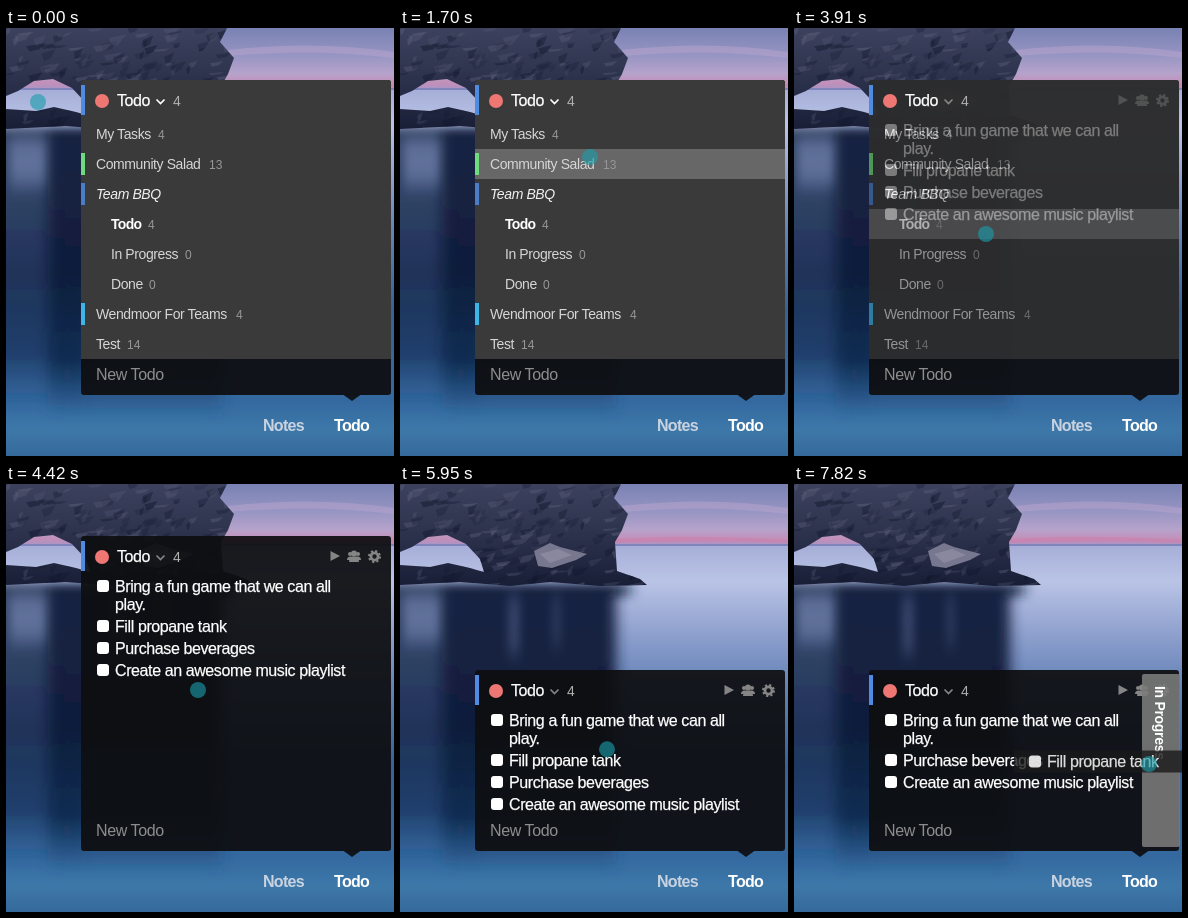
An HTML page for the animation above (7.99 s loop, 388 by 428 pixels).

```html
<!DOCTYPE html>
<html lang="en">
<head>
<meta charset="utf-8">
<title>Todo panel</title>
<style>
  html, body { margin: 0; width: 100%; height: 100%; overflow: hidden; background: #16294c; }
  svg { display: block; width: 388px; height: 428px; }
  text { font: 16px "Liberation Sans", Arial, sans-serif; letter-spacing: -.4px; fill: #fff; white-space: pre; }
  .item { stroke: #fff; stroke-width: .25px; }
  .row { font-size: 14px; fill: #d6d6d6; }
  .strong { font-weight: bold; fill: #fff; letter-spacing: -.7px; }
  .title { font-style: italic; fill: #f0f0f0; }
  .count { font-size: 12px; letter-spacing: 0; fill: #979797; }
  .hint { fill: #8d8d8d; }
  .tab { font-weight: bold; letter-spacing: -.7px; }
</style>
</head>
<body>
<svg viewBox="0 0 388 428">
  <defs>
    <linearGradient id="sky" x2="0" y2="1">
      <stop offset="0" stop-color="#7982b3"/>
      <stop offset=".45" stop-color="#9795c3"/>
      <stop offset=".75" stop-color="#b6a3cb"/>
      <stop offset=".9" stop-color="#c38fb9"/>
      <stop offset="1" stop-color="#a994c4"/>
    </linearGradient>
    <linearGradient id="water" x2="0" y2="1">
      <stop offset="0" stop-color="#a5add6"/>
      <stop offset=".1" stop-color="#bac4e6"/>
      <stop offset=".24" stop-color="#8fa1ce"/>
      <stop offset=".38" stop-color="#6784b8"/>
      <stop offset=".6" stop-color="#36629a"/>
      <stop offset=".85" stop-color="#3469a0"/>
      <stop offset=".93" stop-color="#3d78a9"/>
      <stop offset="1" stop-color="#35699b"/>
    </linearGradient>
    <linearGradient id="shade" x2="0" y2="1">
      <stop offset="0" stop-color="#172344"/>
      <stop offset=".5" stop-color="#101d3b"/>
      <stop offset=".8" stop-color="#12294e" stop-opacity=".85"/>
      <stop offset="1" stop-color="#1d4473" stop-opacity="0"/>
    </linearGradient>
    <linearGradient id="stone" x2="0" y2="1">
      <stop offset="0" stop-color="#3c425e"/>
      <stop offset=".55" stop-color="#2b304a"/>
      <stop offset="1" stop-color="#181e36"/>
    </linearGradient>
    <filter id="soft" x="-30%" y="-30%" width="160%" height="160%"><feGaussianBlur stdDeviation="7 5"/></filter>
    <filter id="haze" x="-30%" y="-30%" width="160%" height="160%"><feGaussianBlur stdDeviation="4 9"/></filter>
    <clipPath id="rockClip">
      <path id="rockShape" clip-rule="evenodd" fill-rule="evenodd" d="M0 0H221L214 14L228 30L222 46L215 58L217 87L240 95L247 101L200 102L150 98L110 102L60 98L0 101V81L30 83L48 79L70 84L84 88L80 75L66 60L47 51L28 53L12 63L0 68Z"/>
    </clipPath>
  </defs>

  <rect width="388" height="61" fill="url(#sky)"/>
  <path d="M215 55Q300 50 388 56V59Q300 56 215 59Z" fill="#cb82ae" opacity=".7"/>
  <path d="M222 22Q310 12 388 24V30Q310 20 222 28Z" fill="#b9a5cd" opacity=".5"/>
  <rect y="60" width="388" height="368" fill="url(#water)"/>
  <rect y="60" width="388" height="2" fill="#7f85bb"/>
  <g filter="url(#soft)">
    <rect x="-30" y="112" width="110" height="270" fill="url(#shade)" opacity=".72"/>
    <rect x="42" y="101" width="174" height="290" fill="url(#shade)"/>
    <rect x="-20" y="99" width="250" height="14" fill="#152040" opacity=".75"/>
  </g>
  <g filter="url(#haze)" fill="#8090bf">
    <rect x="4" y="112" width="36" height="45" opacity=".55"/>
    <rect x="108" y="112" width="12" height="58" opacity=".3"/>
    <rect x="152" y="112" width="9" height="50" opacity=".2"/>
  </g>
  <use href="#rockShape" fill="url(#stone)"/>
  <g id="facets" clip-path="url(#rockClip)"></g>
  <path d="M134 67L150 59L160 63L187 70L176 76L152 84L138 82Z" fill="#77778f"/>
  <path d="M140 70L158 65L172 71L150 79Z" fill="#9695a8" opacity=".6"/>

  <text class="tab" x="257" y="403" style="fill:#c9d3e0">Notes</text>
  <text class="tab" x="328" y="403">Todo</text>
  <path d="M337 366.500H355L346 373Z" fill="#10141b"/>
  <rect id="panel" x="75" width="310" rx="3" fill="#0d0e11" fill-opacity=".93"/>
  <text class="hint" x="90" y="352">New Todo</text>

  <g id="list">
    <g id="icons" fill="#858585">
      <path d="M324.500 67L334 72L324.500 77Z"/>
      <g id="people">
        <circle cx="344" cy="70" r="2"/><circle cx="352" cy="70" r="2"/>
        <path d="M341 76Q341 72.500 344.500 72.500H351.500Q355 72.500 355 76Z"/>
        <circle cx="348" cy="69.500" r="3"/>
        <path d="M343 78Q343 73.500 348 73.500T353 78Z"/>
      </g>
      <circle cx="368.500" cy="72.500" r="3.600" fill="none" stroke="#858585" stroke-width="2.800"/>
      <circle cx="368.500" cy="72.500" r="5.500" fill="none" stroke="#858585" stroke-width="2" stroke-dasharray="2.160"/>
    </g>
  </g>

  <g id="menu">
    <path d="M75 331V55Q75 52 78 52H382Q385 52 385 55V331Z" fill="#3a3a3a"/>
    <rect id="hover" x="75" width="310" height="30" fill="#676767"/>
  </g>

  <g id="header">
    <rect x="75" y="57" width="4" height="30" fill="#4f8be0"/>
    <circle cx="96" cy="73" r="7" fill="#ee7774"/>
    <text class="item" x="111" y="78">Todo</text>
    <path id="chevron" d="M150.500 71.500L154.500 75.500L158.500 71.500" fill="none" stroke-width="1.700"/>
    <text class="count" x="167" y="78" style="font-size:14px;fill:#b0b0b0">4</text>
  </g>

  <g id="zone">
    <rect id="zoneBox" y="190" height="173" rx="2" fill="#7b7b7b" fill-opacity=".88"/>
    <text id="zoneText" class="strong" transform="translate(361 202) rotate(90)" style="font-size:14px;letter-spacing:-.3px">In Progress</text>
  </g>
  <g id="dragged">
    <rect x="76" y="265" width="330" height="22" fill="#191919" fill-opacity=".8"/>
    <g fill="#ddd"><circle cx="362" cy="276.500" r="1.500"/><circle cx="367" cy="276.500" r="1.500"/><circle cx="372" cy="276.500" r="1.500"/></g>
  </g>
  <circle id="cursor" r="8" fill="#1a9dab" fill-opacity=".62"/>
</svg>
<script>
const FRAME = 170, LOOP = 7990;
const MENU_CLOSE = 3910, SHRINK = 5100, GRAB = 6290, REFLOW = 7480;
const TALL = 52, SHORT = 186;

const $ = id => document.getElementById(id);

function add(parent, tag, attrs, content) {
  const el = document.createElementNS('http://www.w3.org/2000/svg', tag);
  for (const key in attrs) el.setAttribute(key, attrs[key]);
  if (content) el.textContent = content;
  parent.appendChild(el);
  return el;
}

// Rock texture: seeded slanted facets
let seed = 11;
const random = () => (seed = seed * 16807 % 2147483647) / 2147483647;
for (let i = 0; i < 170; i++) {
  const x = random() * 240, y = random() * 102, w = 4 + random() * 16, h = 2 + random() * 7;
  add($('facets'), 'path', {
    d: `M${x} ${y}l${w} ${-h / 2}l${-w / 3} ${h}l${-w / 2} ${h / 3}Z`,
    fill: random() < .45 ? '#5e617b' : '#11172d',
    opacity: .15 + random() * .35
  });
}

// Menu rows: label, count, indent, count position, class, stripe
const ROWS = [
  ['My Tasks', 4, 90, 152, ''],
  ['Community Salad', 13, 90, 203, '', '#70db7c'],
  ['Team BBQ', '', 90, 0, 'title', '#4b7dc6'],
  ['Todo', 4, 105, 142, 'strong'],
  ['In Progress', 0, 105, 179, ''],
  ['Done', 0, 105, 143, ''],
  ['Wendmoor For Teams', 4, 90, 230, '', '#3fb4e6'],
  ['Test', 14, 90, 121, '']
];
ROWS.forEach(([label, count, x, countX, style, stripe], i) => {
  const y = 106 + i * 30, menu = $('menu');
  if (stripe) add(menu, 'rect', { x: 75, y: y - 11, width: 4, height: 22, fill: stripe });
  add(menu, 'text', { class: 'row ' + style, x, y: y + 5 }, label);
  if (count !== '') add(menu, 'text', { class: 'count', x: countX, y: y + 5 }, String(count));
});

function addItem(parent, y, ...lines) {
  const item = add(parent, 'g', {});
  add(item, 'rect', { x: 91, y: y - 6, width: 12, height: 12, rx: 3, fill: '#fff' });
  lines.forEach((line, i) => add(item, 'text', { class: 'item', x: 109, y: y + 5.5 + i * 18 }, line));
  return item;
}
addItem($('list'), 102, 'Bring a fun game that we can all', 'play.');
const tank = addItem($('list'), 142, 'Fill propane tank');
const rest = add($('list'), 'g', {});
addItem(rest, 164, 'Purchase beverages');
addItem(rest, 186, 'Create an awesome music playlist');
addItem($('dragged'), 276, 'Fill propane tank').setAttribute('opacity', .85);

const PATH = [
  [0, 32, 74], [170, 34, 75], [680, 116, 82], [1190, 186, 100], [1700, 190, 129],
  [2210, 191, 178], [2380, 191, 178], [2890, 192, 195], [3400, 192, 206],
  [4930, 192, 206], [5100, 190, 207], [5610, 199, 240], [6120, 211, 278],
  [6290, 211, 279], [6800, 235, 280], [7310, 289, 280], [7820, 355, 280]
];
const ZONE = [[6290, 0], [6630, 8], [7310, 8], [7820, 38]];
const MENU_FADE = [[3740, 1], [4250, 0]];

function at(track, t, column = 1) {
  const next = track.findIndex(step => step[0] > t);
  if (next === 0) return track[0][column];
  if (next < 0) return track[track.length - 1][column];
  const a = track[next - 1], b = track[next];
  return a[column] + (b[column] - a[column]) * (t - a[0]) / (b[0] - a[0]);
}

const set = (id, name, value) => $(id).setAttribute(name, value);
const show = (el, visible) => { el.style.display = visible ? '' : 'none'; };

function render(t) {
  const x = at(PATH, t, 1), y = at(PATH, t, 2);
  const top = t < SHRINK ? TALL : SHORT;
  const menuOpen = t < MENU_CLOSE, dragging = t >= GRAB;

  set('panel', 'y', top);
  set('panel', 'height', 367 - top);
  for (const id of ['list', 'header']) set(id, 'transform', `translate(0 ${top - TALL})`);

  const fade = at(MENU_FADE, t);
  show($('menu'), fade > 0);
  set('menu', 'opacity', fade);
  const row = Math.floor((y - 91) / 30);
  show($('hover'), x > 75 && row >= 0);
  set('hover', 'y', 91 + row * 30);

  const headerHover = !menuOpen && y > top && y < top + 38;
  set('chevron', 'stroke', menuOpen || headerHover ? '#fff' : '#858585');

  show(tank, !dragging);
  rest.setAttribute('transform', `translate(0 ${t >= REFLOW ? -22 : 0})`);
  show($('dragged'), dragging);
  set('dragged', 'transform', `translate(${x - 211} 1.500)`);

  const width = at(ZONE, t);
  show($('zone'), width > 0);
  set('zoneBox', 'x', 386 - width);
  set('zoneBox', 'width', width);
  show($('zoneText'), width > 24);

  show($('cursor'), !dragging || t >= 7310);
  set('cursor', 'cx', x);
  set('cursor', 'cy', y);
}

const start = performance.now();
function tick() {
  const t = (performance.now() - start) % LOOP;
  render(Math.floor(t / FRAME) * FRAME);
  requestAnimationFrame(tick);
}
tick();
</script>
</body>
</html>
```
